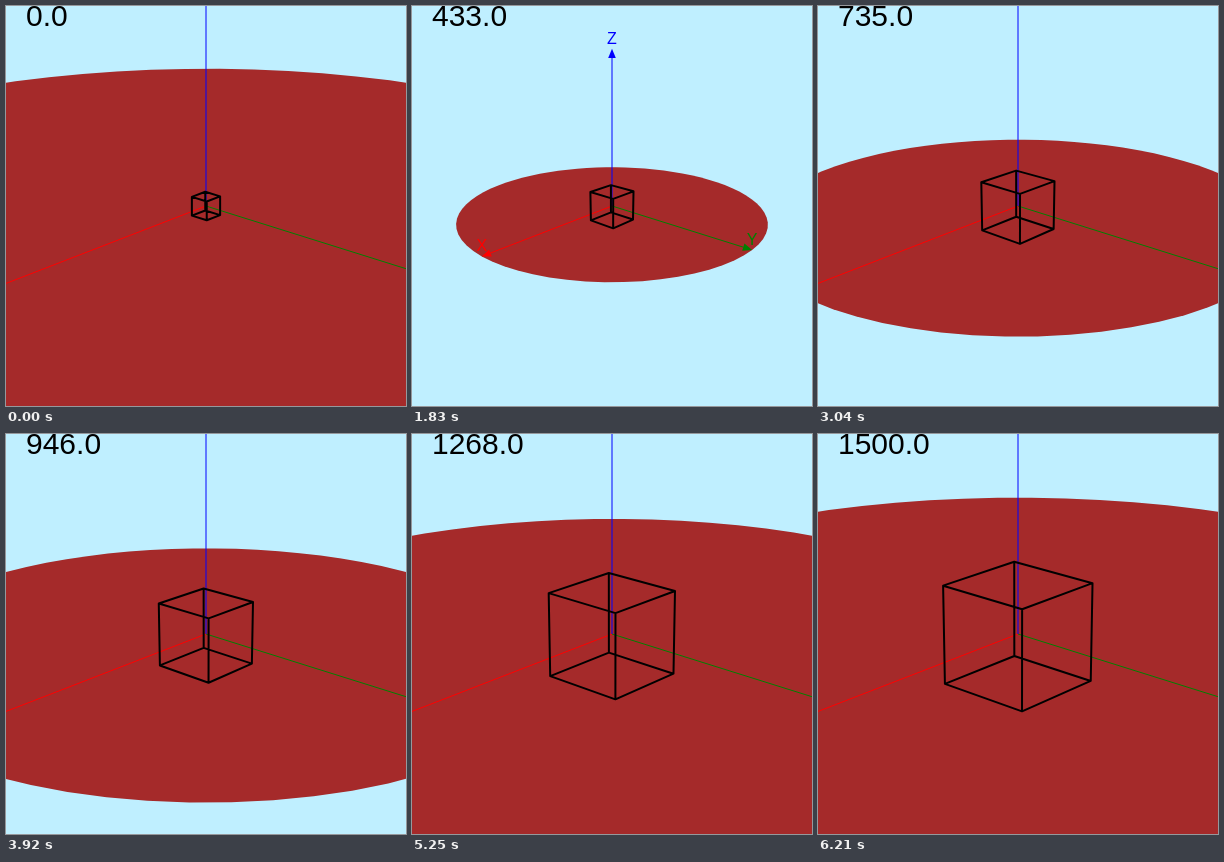
Animation, 400 px wide and 400 px high, one loop 6250 ms. Source, as an HTML page with a canvas:

```html
<!DOCTYPE html>
<html lang="en">
<head>
<meta charset="utf-8">
<title>Perspective</title>
<style>
  html, body { margin: 0; width: 100%; height: 100%; overflow: hidden; background: #bfefff; }
  canvas { display: block; }
</style>
</head>
<body>
<canvas id="stage" width="400" height="400"></canvas>
<script>
const ctx = document.getElementById('stage').getContext('2d');
const FRAMES = 150, LOOP = 6250, MAX_FOCAL = 1500, MIN_FOCAL = 300;
const FONT = '"Liberation Sans", Arial, sans-serif';

// The camera looks from here at the origin, with Z up.
const eye = [200, 180, 100];
const distance = Math.hypot(...eye);
const ground = Math.hypot(eye[0], eye[1]);
const cosA = eye[0] / ground, sinA = eye[1] / ground;
const cosE = ground / distance, sinE = eye[2] / distance;

// A focal length of 0 means a parallel projection.
function project([x, y, z], focal) {
  const toward = x * cosA + y * sinA;
  const depth = distance - toward * cosE - z * sinE;
  const scale = focal ? focal / depth : 1;
  return [200 + (y * cosA - x * sinA) * scale, 200 + (toward * sinE - z * cosE) * scale];
}

function focalAt(frame) {
  const value = Math.round(frame * MAX_FOCAL / (FRAMES - 1));
  return value < MIN_FOCAL ? 0 : value;
}

function drawDisc(focal) {
  const sides = 72;
  ctx.beginPath();
  for (let i = 0; i < sides; i++) {
    const angle = i * 2 * Math.PI / sides;
    ctx.lineTo(...project([100 * Math.cos(angle), 100 * Math.sin(angle), 0], focal));
  }
  ctx.fillStyle = '#a52a2a';
  ctx.fill();
}

function drawAxis(name, end, color, focal) {
  const [x, y] = project(end, focal);
  const angle = Math.atan2(y - 200, x - 200);
  const headPoint = turn => [x - 10 * Math.cos(angle + turn), y - 10 * Math.sin(angle + turn)];
  ctx.strokeStyle = ctx.fillStyle = color;
  ctx.lineWidth = 1;
  ctx.beginPath();
  ctx.moveTo(200, 200);
  ctx.lineTo(x - 9 * Math.cos(angle), y - 9 * Math.sin(angle));
  ctx.stroke();
  ctx.beginPath();
  ctx.moveTo(x, y);
  ctx.lineTo(...headPoint(Math.PI / 8));
  ctx.lineTo(...headPoint(-Math.PI / 8));
  ctx.fill();
  ctx.font = '16px ' + FONT;
  ctx.textAlign = 'center';
  ctx.fillText(name, x, y - 5);
}

function drawCube(focal) {
  const corners = [[-10, -10], [10, -10], [10, 10], [-10, 10]];
  const top = corners.map(c => project([...c, 10], focal));
  const bottom = corners.map(c => project([...c, -10], focal));
  ctx.beginPath();
  for (const face of [top, bottom]) {
    face.forEach((p, i) => i ? ctx.lineTo(...p) : ctx.moveTo(...p));
    ctx.closePath();
  }
  top.forEach((p, i) => {
    ctx.moveTo(...p);
    ctx.lineTo(...bottom[i]);
  });
  ctx.strokeStyle = '#000';
  ctx.lineWidth = 2;
  ctx.lineJoin = 'round';
  ctx.stroke();
}

function draw(time) {
  const frame = Math.min(FRAMES - 1, Math.floor((time % LOOP + 2) * FRAMES / LOOP));
  const focal = focalAt(frame);
  // The scenery lags one step behind the cube.
  const lagging = focalAt((frame + FRAMES - 1) % FRAMES);

  ctx.fillStyle = '#bfefff';
  ctx.fillRect(0, 0, 400, 400);
  drawDisc(lagging);
  drawAxis('X', [100, 0, 0], '#f00', lagging);
  drawAxis('Y', [0, 100, 0], '#008000', lagging);
  drawAxis('Z', [0, 0, 100], '#00f', lagging);
  drawCube(focal);

  ctx.fillStyle = '#000';
  ctx.font = '30px ' + FONT;
  ctx.textAlign = 'left';
  ctx.fillText(focal.toFixed(1), 20, 20);
}

const start = performance.now();
function tick() {
  draw(performance.now() - start);
  requestAnimationFrame(tick);
}
tick();
</script>
</body>
</html>
```
